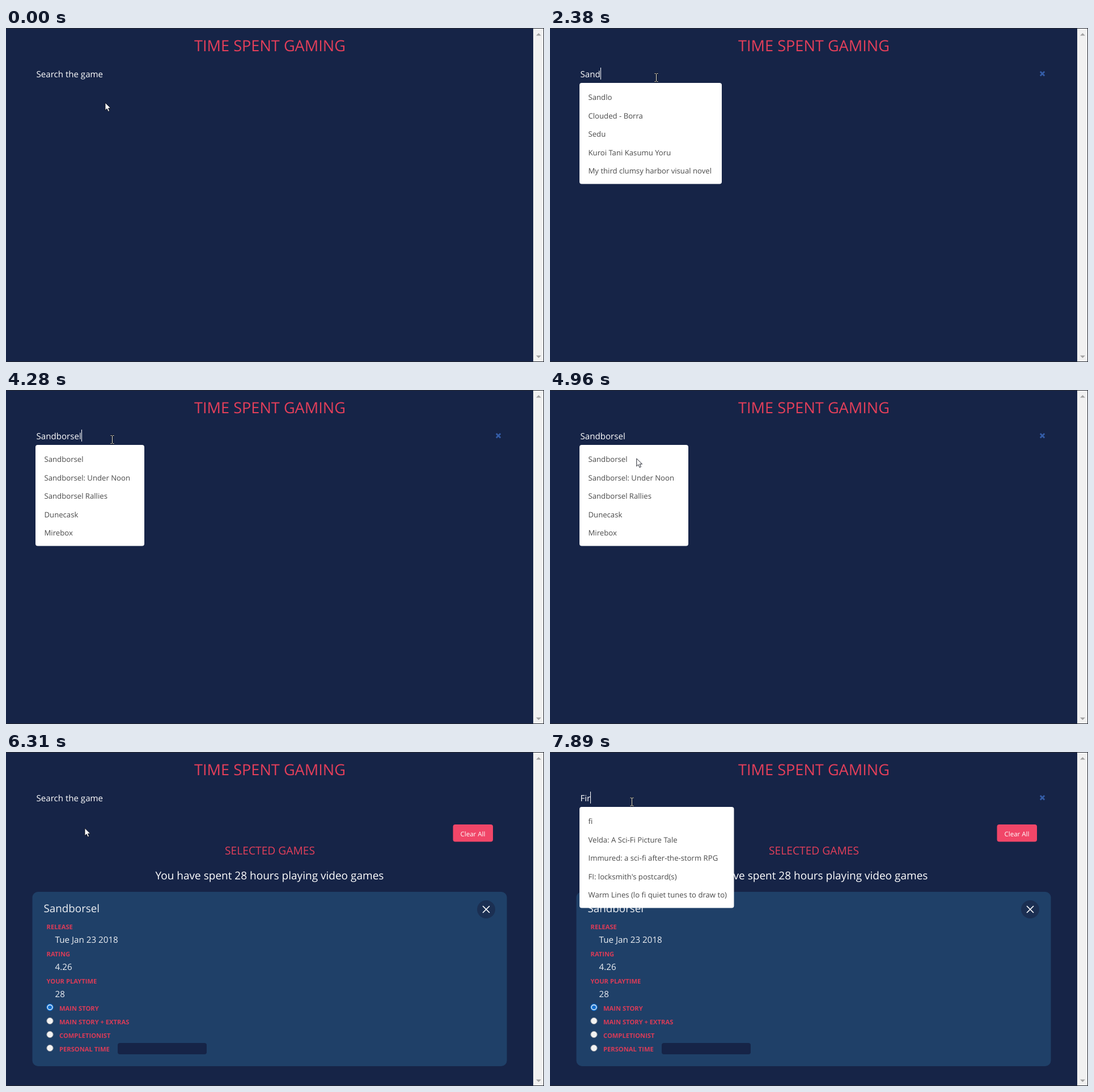
Recreate the animation shown at these times as an HTML page. Size 949 by 590 pixels, loop 8000 ms.

```html
<!DOCTYPE html>
<html lang="en">
<head>
<meta charset="utf-8">
<title>Time spent gaming</title>
<style>
  html, body { margin: 0; width: 100%; height: 100%; overflow: hidden; background: #162447; }
  svg { display: block; font-family: "Open Sans", "Noto Sans", sans-serif; text-rendering: geometricPrecision; }
  text { white-space: pre; }
  .mid { text-anchor: middle; }
  .red { fill: #e43f5a; }
  .input { font-size: 15.1px; fill: #fff; }
  .value { font-size: 15.2px; fill: #eef0f4; }
  .label { font-size: 11.2px; font-weight: 700; fill: #d93b58; }
  .item { font-size: 13.15px; fill: #4a4a4a; }
</style>
</head>
<body>
<svg width="949" height="590">
  <rect width="949" height="590" fill="#162447"/>
  <text class="mid red" x="465.5" y="41" font-size="27.1">TIME SPENT GAMING</text>

  <g id="details">
    <rect x="788.5" y="128" width="70.5" height="30.5" rx="4" fill="#f14668"/>
    <text class="mid" x="823.5" y="149" font-size="11.5" fill="#fff">Clear All</text>
    <text class="mid red" x="465.5" y="181" font-size="19.2">SELECTED GAMES</text>
    <text class="mid" x="465" y="225" font-size="19" fill="#fff">You have spent 28 hours playing video games</text>
    <rect x="46.5" y="247" width="837" height="308" rx="10" fill="#1f4068"/>
    <text x="66.5" y="283" font-size="18.8" fill="#eef0f4">Sandborsel</text>
    <circle cx="847" cy="278" r="16" fill="#1b2f52"/>
    <path d="M841 272l12 12m0-12l-12 12" stroke="#fff" stroke-width="1.7"/>
    <g id="facts"></g>
    <rect x="197" y="514" width="157" height="20" rx="4" fill="#162447"/>
  </g>

  <text id="loading" class="input" x="47" y="77">Loading Details...</text>

  <g id="search">
    <text id="query" class="input" x="53.5" y="87"></text>
    <rect id="caret" y="70" width="1" height="21" fill="#fff" shape-rendering="crispEdges"/>
    <path id="clear" d="M864.8 77l7.4 7.4m0-7.4l-7.4 7.4" stroke="#345ca6" stroke-width="2.8"/>
    <g id="panel">
      <rect id="sheet" x="52" y="97" height="178.5" rx="4" fill="#fff"/>
      <g id="items"></g>
    </g>
  </g>

  <g id="cursor">
    <path id="arrow" d="M0 0V13.5L3.1 10.6L5.2 15.6L7.6 14.6L5.5 9.7H9.8Z" fill="#fff" stroke="#0a0d18" stroke-width=".9"/>
    <g id="beam" fill="none">
      <path d="M-3-7H-1L0-6L1-7H3M0-6V6M-3 7H-1L0 6L1 7H3" stroke="#10141f" stroke-width="2.4"/>
      <path d="M-3-7H-1L0-6L1-7H3M0-6V6M-3 7H-1L0 6L1 7H3" stroke="#e6e3d6"/>
    </g>
  </g>

  <rect x="930" width="18" height="590" fill="#f1f1f1"/>
  <path d="M935 13.5l4.5-4.5l4.5 4.5zM935 578.5l4.5 4.5l4.5-4.5z" fill="#a3a3a3"/>
  <path d="M0 .5H949M0 589.5H949M948.5 0V590" stroke="#22262f"/>
</svg>
<script>
const LOOP = 8000;
const el = id => document.getElementById(id);
const show = (id, on) => el(id).setAttribute('display', on ? 'inline' : 'none');
const text = (cls, x, y, s) => `<text class="${cls}" x="${x}" y="${y}">${s}</text>`;

const facts = [['RELEASE', 'Tue Jan 23 2018'], ['RATING', '4.26'], ['YOUR PLAYTIME', '28']];
const options = ['MAIN STORY', 'MAIN STORY + EXTRAS', 'COMPLETIONIST', 'PERSONAL TIME'];

const radio = (y, on) =>
  `<circle cx="77.5" cy="${y}" r="5.7" fill="#f2f2f2" stroke="${on ? '#0f6fd0' : '#8a8f98'}" stroke-width="${on ? 1.4 : 1}"/>` +
  (on ? `<circle cx="77.5" cy="${y}" r="3.6" fill="#0f6fd0"/>` : '');

el('facts').innerHTML =
  facts.map(([name, value], i) =>
    text('label', 71.5, 312.5 + i * 48, name) + text('value', 86.5, 337 + i * 48, value)).join('') +
  options.map((name, i) => radio(451 + i * 24, !i) + text('label', 94, 457 + i * 24, name)).join('');

// Suggestion lists: visible from, until, panel width, rows
const lists = [
  [1840, 4100, 251, ['Sandlo', 'Clouded - Borra', 'Sedu', 'Kuroi Tani Kasumu Yoru',
    'My third clumsy harbor visual novel']],
  [4100, 5410, 192, ['Sandborsel', 'Sandborsel: Under Noon', 'Sandborsel Rallies', 'Dunecask', 'Mirebox']],
  [7710, LOOP, 272.5, ['fi', 'Velda: A Sci-Fi Picture Tale', 'Immured: a sci-fi after-the-storm RPG',
    "FI: locksmith's postcard(s)", 'Warm Lines (lo fi quiet tunes to draw to)']],
];

// Focus, then one keystroke per time
const sessions = [
  { focus: 980, end: 5410, word: 'Sandborsel', keys: [1660, 1840, 2020, 2290, 2740, 3250, 3420, 3600, 3830, 4010] },
  { focus: 6950, end: LOOP, word: 'Fir', keys: [7400, 7490, 7850] },
];

// Pointer path: time, x, y
const path = [
  [0, 175, 132], [260, 175, 132], [980, 187.5, 87.5], [4510, 187.5, 87.5],
  [5140, 139, 134.5], [6580, 139, 134.5], [6950, 144.5, 88], [LOOP, 144.5, 88],
];

function pointer(t) {
  const i = path.findIndex(p => p[0] > t);
  const [t0, x0, y0] = path[i - 1], [t1, x1, y1] = path[i];
  const k = (t - t0) / (t1 - t0);
  return [x0 + (x1 - x0) * k, y0 + (y1 - y0) * k];
}

let shownList;
function drawPanel(t) {
  const list = lists.find(([from, to]) => t >= from && t < to);
  show('panel', list);
  if (!list || list === shownList) return;
  shownList = list;
  el('sheet').setAttribute('width', list[2]);
  el('items').innerHTML = list[3].map((s, i) => text('item', 67.5, 127.3 + i * 32.5, s)).join('');
}

function drawQuery(t) {
  const session = sessions.find(s => t >= s.focus && t < s.end);
  const pressed = session ? session.keys.filter(k => k <= t) : [];
  const typed = session ? session.word.slice(0, pressed.length) : '';
  const query = el('query');
  query.textContent = typed || 'Search the game';
  show('clear', typed);
  const last = session && (pressed.at(-1) ?? session.focus);
  show('caret', session && Math.floor((t - last) / 500) % 2 === 0);
  el('caret').setAttribute('x', Math.round(53.5 + (typed ? query.getComputedTextLength() : 0)));
}

function frame(now) {
  const t = now % LOOP;
  const loading = t >= 5410 && t < 6310;
  show('loading', loading);
  show('search', !loading);
  show('details', t >= 6310);
  drawQuery(t);
  drawPanel(t);

  const [x, y] = pointer(t);
  const overInput = !loading && y < 97;
  show('beam', overInput);
  show('arrow', !overInput);
  el('cursor').setAttribute('transform', `translate(${x} ${y})`);
  requestAnimationFrame(frame);
}
requestAnimationFrame(frame);
</script>
</body>
</html>
```
